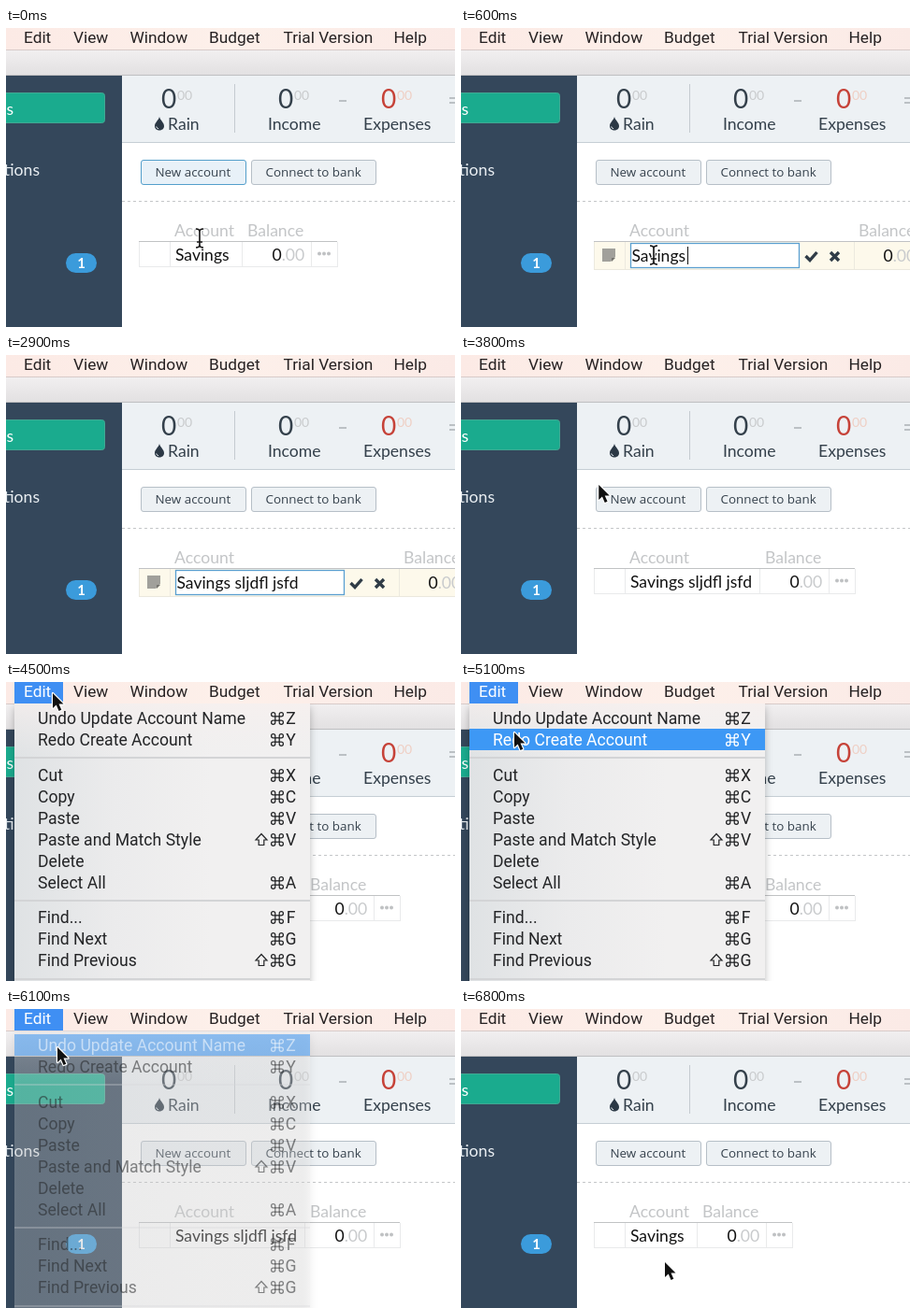
Write an HTML page with a canvas that moves like this. It is 480 px wide and 320 px high and loops after 6.9 s.

```html
<!DOCTYPE html>
<html lang="en">
<head>
<meta charset="utf-8">
<title>Undo account rename</title>
<style>
html, body { margin: 0; width: 100%; height: 100%; overflow: hidden; background: #fff; }
canvas { display: block; width: 480px; height: 320px; }
</style>
</head>
<body>
<canvas id="stage" width="480" height="320"></canvas>
<script>
const ctx = document.getElementById('stage').getContext('2d');
const LOOP = 6900, STEP = 100;
const LATO = 'Lato, sans-serif', UI = 'Roboto, sans-serif', BUTTON = '"Open Sans", sans-serif';
const INK = '#34404b', PALE = '#c9cbcd';
const TYPED = 'sljdfl jsfd';

// Key moments in ms
const EDIT_AT = 400, SPACE_AT = 1500, TYPE_AT = 1900, SAVE_AT = 3100,
      MENU_AT = 4500, PICK_AT = 5900, FADE_AT = 6000, GONE_AT = 6300, REVERT_AT = 6400;

// Pointer path: time, x, y
const PATH = [
  [0, 207, 225], [300, 206, 243], [3400, 206, 243], [3700, 168, 168],
  [4000, 88, 56], [4300, 50, 12], [4600, 50, 12], [4900, 56, 45],
  [5100, 57, 54], [5300, 57, 55], [5600, 55, 41], [6200, 55, 41],
  [6600, 208, 262], [6800, 218, 271]
];

const MENU = [
  [45, 'Undo Update Account Name', 'Z'], [68, 'Redo Create Account', 'Y'],
  [106, 'Cut', 'X'], [129, 'Copy', 'C'], [152, 'Paste', 'V'],
  [175, 'Paste and Match Style', 'V', true], [198, 'Delete', ''],
  [221, 'Select All', 'A'], [258, 'Find...', 'F'], [281, 'Find Next', 'G'],
  [304, 'Find Previous', 'G', true]
];

function rect(x, y, w, h, fill) {
  ctx.fillStyle = fill;
  ctx.fillRect(x, y, w, h);
}

function pill(x, y, w, h, r, fill, stroke) {
  ctx.beginPath();
  ctx.roundRect(x, y, w, h, r);
  ctx.fillStyle = fill;
  ctx.fill();
  if (stroke) {
    ctx.strokeStyle = stroke;
    ctx.lineWidth = 1;
    ctx.stroke();
  }
}

function text(s, x, y, size, family, color, align = 'left', weight = 400) {
  ctx.font = `${weight} ${size}px ${family}`;
  ctx.fillStyle = color;
  ctx.textAlign = align;
  ctx.fillText(s, x, y);
}

function poly(points, fill) {
  ctx.beginPath();
  points.forEach(([x, y]) => ctx.lineTo(x, y));
  ctx.closePath();
  if (fill) {
    ctx.fillStyle = fill;
    ctx.fill();
  }
}

function shade(x0, y0, x1, y1, ...colors) {
  const g = ctx.createLinearGradient(x0, y0, x1, y1);
  colors.forEach((c, i) => g.addColorStop(i / (colors.length - 1), c));
  return g;
}

function pointerAt(t) {
  const i = PATH.findIndex(p => p[0] > t);
  if (i < 0) return PATH[PATH.length - 1].slice(1);
  const [t0, x0, y0] = PATH[i - 1], [t1, x1, y1] = PATH[i];
  let k = (t - t0) / (t1 - t0);
  k = k * k * (3 - 2 * k);
  return [x0 + (x1 - x0) * k, y0 + (y1 - y0) * k];
}

function drawBars() {
  rect(0, 0, 480, 24, shade(0, 0, 480, 0, '#fceae5', '#fdf0ea', '#fbeae6'));
  rect(0, 23, 480, 1, '#d8cbc9');
  rect(0, 24, 480, 27, shade(0, 24, 0, 51, '#f1eff0', '#e2e0e1'));
  rect(0, 50, 480, 1, '#bfbfc1');
  [['Edit', 19], ['View', 72], ['Window', 132.5], ['Budget', 217], ['Trial Version', 296.5], ['Help', 414.5]]
    .forEach(([s, x]) => text(s, x, 16, 17.3, UI, '#262223'));
}

function drawSidebar() {
  rect(0, 51, 124, 269, '#34475b');
  pill(-9.5, 69.5, 115, 32, 3, '#1aab8e', '#42a893');
  text('s', 8, 93, 17.6, LATO, '#fff', 'right');
  text('tions', 36, 158, 17.6, LATO, '#e9eef2', 'right');
  pill(64, 241, 33, 21, 10.5, '#3b9bdb');
  text('1', 80.5, 257, 15, LATO, '#fff', 'center', 700);
}

function amount(x, label, lx, color, cents) {
  text('0', x, 86, 28, LATO, color);
  text('00', x + 17, 77, 14, LATO, cents);
  text(label, lx, 109, 17.6, LATO, INK);
}

function drawSummary() {
  rect(124, 51, 356, 72, '#edf1f4');
  rect(124, 122, 356, 1, '#c6ced4');
  amount(166, 'Rain', 173, INK, PALE);
  amount(291, 'Income', 280, INK, PALE);
  amount(401, 'Expenses', 382, '#c64238', '#efcfc4');
  rect(244, 60, 1, 52, '#c5cbd0');
  rect(356, 77, 8, 2, '#bbc0c4');
  rect(474, 74, 6, 2, '#bbc0c4');
  rect(474, 79, 6, 2, '#bbc0c4');

  // Rain drop
  ctx.fillStyle = '#2b3845';
  ctx.beginPath();
  ctx.moveTo(164, 95);
  ctx.bezierCurveTo(165, 99, 169, 101, 169, 105);
  ctx.bezierCurveTo(169, 111, 159, 111, 159, 105);
  ctx.bezierCurveTo(159, 101, 163, 99, 164, 95);
  ctx.fill();
  ctx.strokeStyle = '#dfe5ea';
  ctx.lineWidth = 1;
  ctx.beginPath();
  ctx.arc(163.5, 105, 2.8, 1.7, 3);
  ctx.stroke();
}

function drawButtons(focused) {
  pill(144.5, 141.5, 112, 26, 2.5, focused ? '#e8f1f8' : '#edf1f4', focused ? '#549fcb' : '#b6bfc7');
  pill(262.5, 141.5, 133, 26, 2.5, '#edf1f4', '#b6bfc7');
  text('New account', 159.5, 159, 13.4, BUTTON, '#36424d');
  text('Connect to bank', 277.5, 159, 13.4, BUTTON, '#36424d');
  for (let x = 124; x < 480; x += 6) rect(x, 185, 3, 1, '#c4c6c8');
}

function drawHeads(balanceX, right) {
  text('Account', 180, 223, 17.6, LATO, '#c3c5c7');
  text('Balance', balanceX, 223, 17.6, LATO, '#c3c5c7');
  rect(142, 228, right - 142, 1, '#c0c2c4');
}

function drawBalance(x, y) {
  text('0', x, y, 17.6, LATO, '#111');
  text('.00', x + 10.2, y, 17.6, LATO, PALE);
}

function drawRow(name, shift) {
  const right = 354 + shift;
  drawHeads(258 + shift, right);
  [142, 175, 252 + shift, 326 + shift, right].forEach(x => rect(x, 229, 1, 27, '#e9eaeb'));
  rect(142, 255, right - 141, 1, '#e9eaeb');
  text(name, 181, 248.5, 17.5, LATO, '#111');
  drawBalance(284.5 + shift, 248.5);
  for (let i = 0; i < 3; i++) {
    ctx.beginPath();
    ctx.arc(335 + shift + i * 5, 241.5, 2, 0, 7);
    ctx.fillStyle = '#bfc1c3';
    ctx.fill();
  }
}

function drawEditor(value, caret) {
  drawHeads(425, 480);
  rect(142, 229, 338, 29, '#fdf9eb');
  rect(142, 258, 338, 1, '#ebe8dd');
  [142, 175, 420].forEach(x => rect(x, 229, 1, 29, '#ece9df'));
  poly([[151, 236], [165, 236], [165, 245], [160, 250], [151, 250]], '#a1a09b');
  poly([[161, 250], [161, 246], [165, 246]], '#75746f');
  rect(181.5, 230.5, 181, 26, '#fff');
  ctx.strokeStyle = '#5a9fd0';
  ctx.lineWidth = 1.3;
  ctx.strokeRect(181.5, 230.5, 180, 26);
  text(value, 182.5, 249.5, 17.5, LATO, '#111');
  if (caret) rect(Math.round(184 + ctx.measureText(value).width), 234, 1, 19, '#111');

  ctx.strokeStyle = '#303c47';
  ctx.lineWidth = 3.4;
  ctx.beginPath();
  ctx.moveTo(368.5, 244);
  ctx.lineTo(373, 248.5);
  ctx.lineTo(380.5, 240);
  ctx.moveTo(395, 240);
  ctx.lineTo(404, 249);
  ctx.moveTo(404, 240);
  ctx.lineTo(395, 249);
  ctx.stroke();
  drawBalance(451.5, 249.5);
}

function commandSign(cx, cy, color) {
  const a = 2.2, r = 2.1, b = a + r;
  ctx.strokeStyle = color;
  ctx.lineWidth = 1.25;
  ctx.strokeRect(cx - a, cy - a, 2 * a, 2 * a);
  [[-1, -1, 0], [1, -1, 1], [1, 1, 2], [-1, 1, 3]].forEach(([sx, sy, q]) => {
    ctx.beginPath();
    ctx.arc(cx + sx * b, cy + sy * b, r, (q + 1) * Math.PI / 2, (q + 4) * Math.PI / 2);
    ctx.moveTo(cx + sx * a, cy + sy * b);
    ctx.lineTo(cx + sx * a, cy + sy * a);
    ctx.lineTo(cx + sx * b, cy + sy * a);
    ctx.stroke();
  });
}

function shiftSign(x, y, color) {
  const shape = [[0, -6.5], [6, 0], [2.8, 0], [2.8, 5.5], [-2.8, 5.5], [-2.8, 0], [-6, 0]];
  poly(shape.map(([dx, dy]) => [x + dx, y + dy]));
  ctx.strokeStyle = color;
  ctx.lineWidth = 1.2;
  ctx.stroke();
}

function drawPanel() {
  ctx.save();
  ctx.shadowColor = 'rgba(0,0,0,.26)';
  ctx.shadowBlur = 8;
  ctx.shadowOffsetY = 4;
  ctx.beginPath();
  ctx.rect(0, 23, 480, 297);
  ctx.clip();
  rect(9, 23, 316, 310, shade(9, 0, 325, 0, '#dfe2e4', '#ebebec', '#f1f0f0', '#f1f0f0'));
  ctx.restore();
  rect(9, 23, 316, 60, shade(0, 23, 0, 83, 'rgba(248,240,238,.7)', 'rgba(240,238,238,0)'));
  [80, 233, 317].forEach(y => rect(9, y, 316, 2, '#d3d4d6'));
}

// The panel thins out sooner than its labels; the bar title stays lit.
function drawMenu(active, alpha) {
  ctx.save();
  rect(9, 0, 52, 23, '#3f8ff3');
  text('Edit', 19, 16, 17.3, UI, '#fff');
  ctx.globalAlpha = alpha * alpha;
  drawPanel();
  ctx.globalAlpha = alpha;
  MENU.forEach(([y, label, key, shift], i) => {
    const on = i === active, color = on ? '#fff' : '#232426';
    if (on) rect(9, y - 18, 316, 23, '#3d98f5');
    text(label, 34, y, 17.6, UI, color);
    if (!key) return;
    commandSign(290, y - 6, color);
    text(key, 304.5, y, 17.6, UI, color, 'center');
    if (shift) shiftSign(273, y - 6, color);
  });
  ctx.restore();
}

function drawArrow(x, y) {
  const shape = [[0, 0], [0, 16], [3.7, 12.6], [6.5, 19], [9.3, 17.8], [6.5, 11.5], [11.5, 11.5]];
  poly(shape.map(([dx, dy]) => [x + dx, y + dy]));
  ctx.lineJoin = 'round';
  ctx.lineWidth = 2.4;
  ctx.strokeStyle = '#fff';
  ctx.stroke();
  ctx.fillStyle = '#111';
  ctx.fill();
  ctx.lineJoin = 'miter';
}

function drawBeam(x, y) {
  ctx.beginPath();
  ctx.moveTo(x - 4, y - 10);
  ctx.quadraticCurveTo(x, y - 10, x, y - 7);
  ctx.quadraticCurveTo(x, y - 10, x + 4, y - 10);
  ctx.moveTo(x, y - 7);
  ctx.lineTo(x, y + 7);
  ctx.moveTo(x - 4, y + 10);
  ctx.quadraticCurveTo(x, y + 10, x, y + 7);
  ctx.quadraticCurveTo(x, y + 10, x + 4, y + 10);
  ctx.moveTo(x - 3, y + 4);
  ctx.lineTo(x + 3, y + 4);
  [[3.4, '#fff'], [1.6, '#111']].forEach(([w, c]) => {
    ctx.lineWidth = w;
    ctx.strokeStyle = c;
    ctx.stroke();
  });
}

function fieldValue(t) {
  if (t < SPACE_AT) return 'Savings';
  const n = t < 1800 ? 0 : Math.max(1, Math.floor((t - TYPE_AT) / STEP) + 1);
  return 'Savings ' + TYPED.slice(0, n);
}

function draw(t) {
  const [x, y] = pointerAt(t);
  rect(0, 0, 480, 320, '#fff');
  drawBars();
  drawSidebar();
  drawSummary();
  drawButtons(t < EDIT_AT);

  if (t >= EDIT_AT && t < SAVE_AT) drawEditor(fieldValue(t), t < 2900);
  else if (t >= SAVE_AT && t < REVERT_AT) drawRow('Savings ' + TYPED, 67);
  else drawRow('Savings', 0);

  if (t >= MENU_AT && t < GONE_AT) {
    const blink = t === PICK_AT;
    const active = blink || y < 28 ? -1 : y < 51 ? 0 : 1;
    const alpha = t < FADE_AT ? 1 : 0.85 - (t - FADE_AT) / STEP * 0.3;
    drawMenu(active, alpha);
  }

  if (t < SPACE_AT) drawBeam(x, y);
  else if (t >= 3400) drawArrow(x, y);
}

function frame(now) {
  draw(Math.floor((now % LOOP) / STEP) * STEP);
  requestAnimationFrame(frame);
}

draw(0);
requestAnimationFrame(frame);
</script>
</body>
</html>
```
